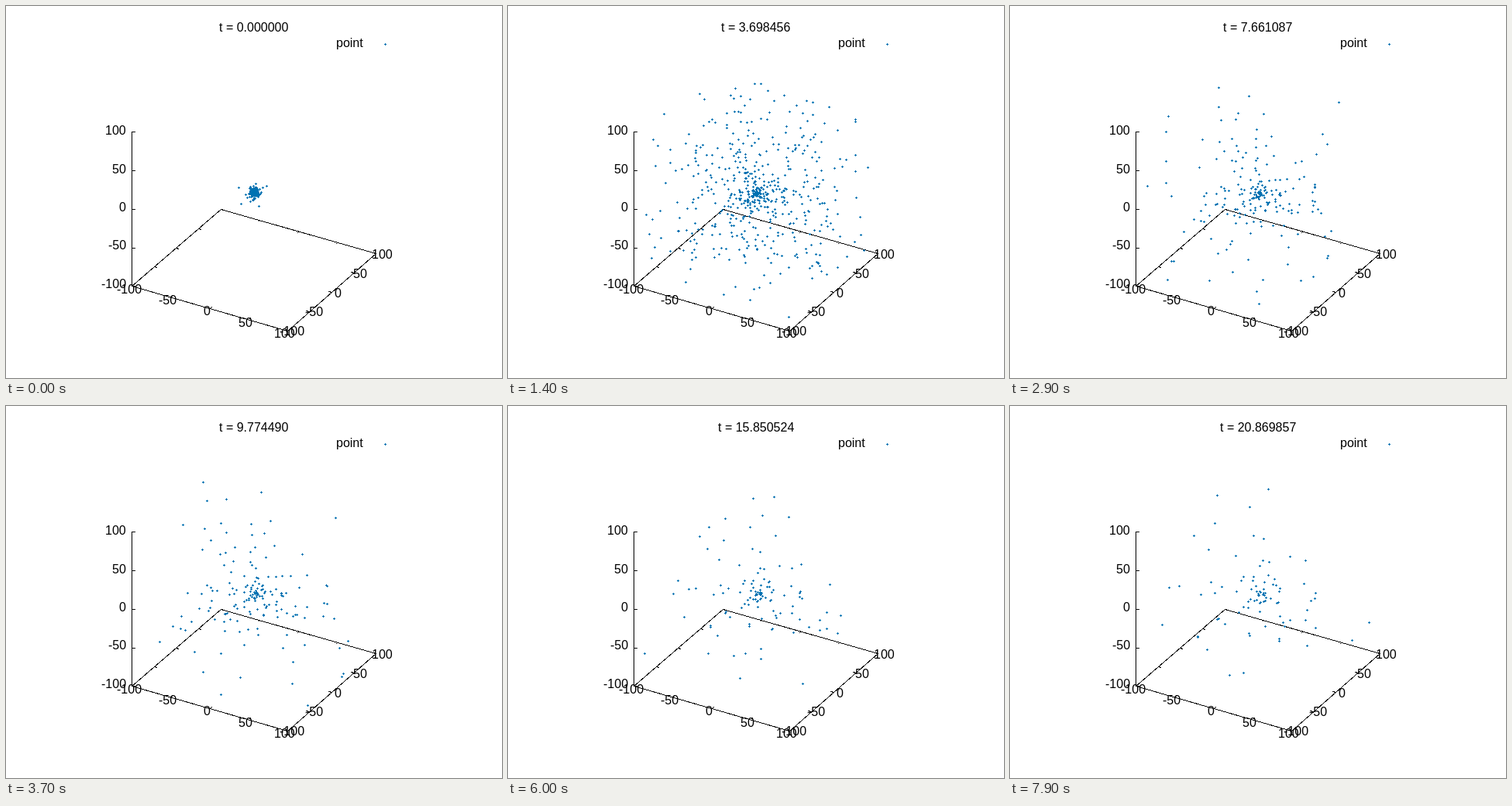
These frames come from a looping animation (640x480 px, 8000 ms). An HTML page:

```html
<!DOCTYPE html>
<html lang="en">
<head>
<meta charset="utf-8">
<title>Expanding points</title>
<style>
  html, body { margin: 0; width: 100%; height: 100%; overflow: hidden; background: #fff; }
  svg { display: block; width: 640px; height: 480px; }
  text { font: 16px "Liberation Sans", Arial, sans-serif; fill: #000; }
  path { shape-rendering: crispEdges; }
  #axes { fill: none; stroke: #000; stroke-width: 1; }
  #dots { fill: #0072b2; }
</style>
</head>
<body>
<svg id="stage" viewBox="0 0 640 480">
  <path id="axes"/>
  <path id="dots"/>
</svg>
<script>
const FRAME_MS = 100, FRAMES = 80, DT = 0.2641754;
const HALF = 100;          // half the side of the plotted cube
const COUNT = 880;
const START = 0, MIDDLE = 0.5, END = 1;
const stage = document.getElementById('stage');
const axes = document.getElementById('axes');
const dots = document.getElementById('dots');

// Oblique view of the cube
const project = ([x, y, z]) => [
  319.75 + 1.003 * x + 0.572 * y,
  240.75 + 0.287 * x - 0.497 * y - 0.995 * z
].map(Math.round);

// Text starts on a whole pixel
function setText(node, text, x, y, align) {
  node.textContent = text;
  node.setAttribute('x', Math.round(x - node.getComputedTextLength() * align));
  node.setAttribute('y', Math.round(y));
}

function addText(text, x, y, align) {
  const node = document.createElementNS('http://www.w3.org/2000/svg', 'text');
  stage.append(node);
  setText(node, text, x, y, align);
  return node;
}

function drawAxes() {
  const floor = (x, y) => project([x, y, -HALF]).map(v => v + .5).join(' ');
  const corners = [floor(-HALF, -HALF), floor(HALF, -HALF), floor(HALF, HALF), floor(-HALF, HALF)];
  let d = `M${corners.join('L')}ZM162.5 162V361.5`;
  for (let i = 0; i < 5; i++) {
    const value = i * 50 - HALF;
    d += `M162 ${project([-HALF, -HALF, value])[1] + .5}h5`;
    d += `M${floor(value, -HALF)}l2 -2M${floor(value, HALF)}l-2 2`;
    d += `M${floor(-HALF, value)}l4 1M${floor(HALF, value)}l-4 -1`;

    const signShift = value < 0 ? 2.7 : 0;
    addText(value, 155, 363.8 - i * 49.4, END);
    addText(value, 158.7 + i * 50.2, 370.6 + i * 14.4, MIDDLE);
    addText(value, 371.7 + i * 28.5 - signShift, 425.1 - i * 24.7, MIDDLE);
  }
  axes.setAttribute('d', d);
}

let seed = 20117;
function random() {
  seed = (seed + 0x6D2B79F5) | 0;
  let t = Math.imul(seed ^ (seed >>> 15), 1 | seed);
  t = (t + Math.imul(t ^ (t >>> 7), 61 | t)) ^ t;
  return ((t ^ (t >>> 14)) >>> 0) / 4294967296;
}

function randomVector(length) {
  const z = 2 * random() - 1, a = 2 * Math.PI * random(), r = Math.sqrt(1 - z * z);
  return [r * Math.cos(a) * length, r * Math.sin(a) * length, z * length];
}

// Even spread of speeds with extra points in a fast outer shell
const randomSpeed = () =>
  (random() < .25 ? 25 + 23 * random() : 48 * random()) * (1 + .3 * random() ** 12);

// A tight cluster with a few strays
const randomDistance = () => 1.5 * (random() + .001) ** -.45;

const points = Array.from({ length: COUNT }, () => ({
  start: randomVector(randomDistance()),
  velocity: randomVector(randomSpeed())
}));

const plus = ([x, y]) => `M${x - 1} ${y}h3v1h-3zM${x} ${y - 1}h1v3h-1z`;

function draw(t) {
  let d = plus([489, 49]);
  for (const { start, velocity } of points) {
    const pos = start.map((s, i) => s + velocity[i] * t);
    if (pos.every(v => Math.abs(v) <= HALF)) d += plus(project(pos));
  }
  dots.setAttribute('d', d);
  setText(clock, 't = ' + t.toFixed(6), 320, 33, MIDDLE);
}

let shown = -1;
function update() {
  const frame = Math.floor(performance.now() / FRAME_MS) % FRAMES;
  if (frame !== shown) draw(frame * DT);
  shown = frame;
  requestAnimationFrame(update);
}

drawAxes();
addText('point', 426, 53, START);
const clock = addText('', 320, 33, MIDDLE);
update();
</script>
</body>
</html>
```
